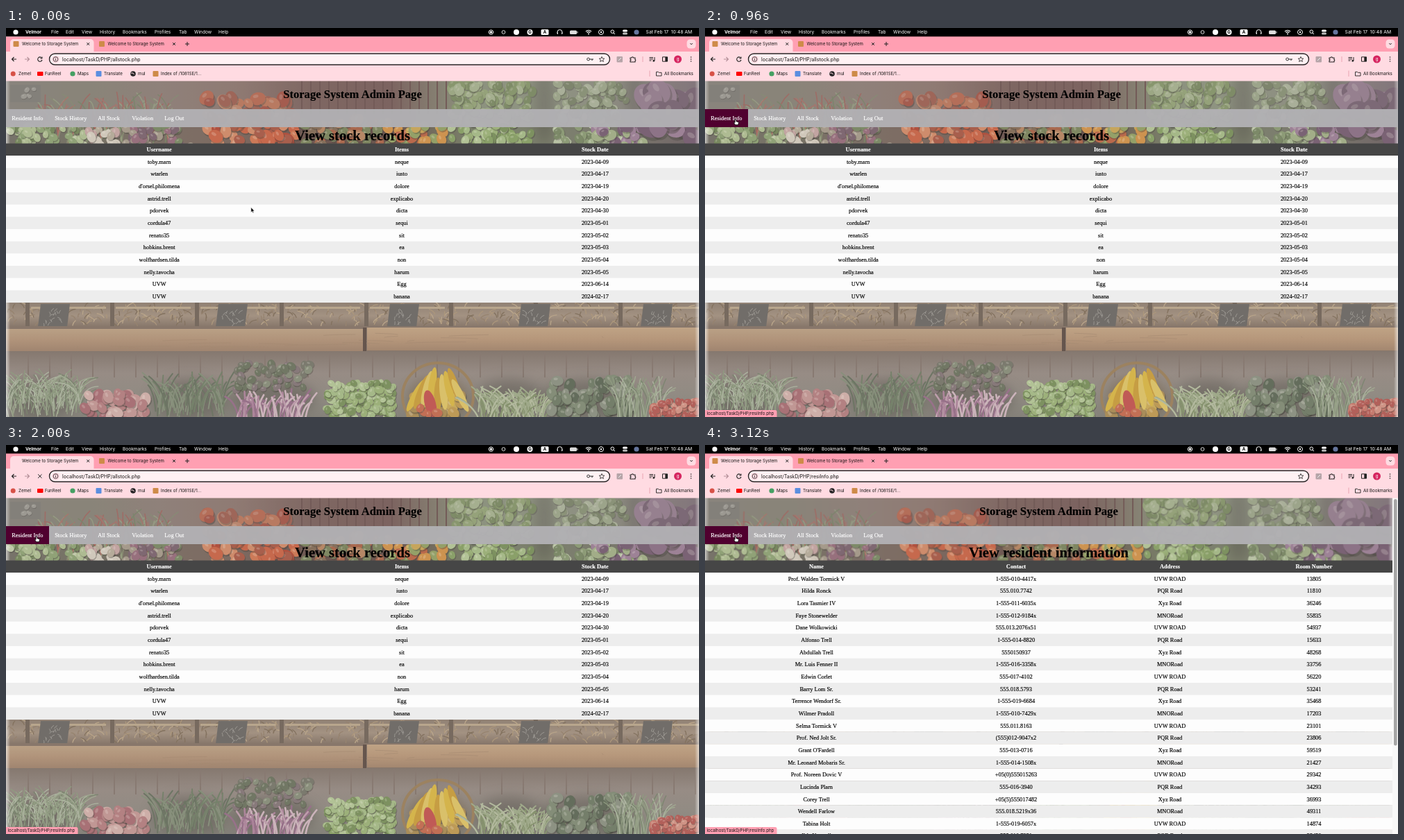
An HTML page with a canvas that plays this animation: 998 by 561 pixels, repeating every 3.2 s.

```html
<!DOCTYPE html>
<html lang="en">
<head>
<meta charset="utf-8">
<title>Storage System</title>
<style>
html, body { margin: 0; width: 100%; height: 100%; overflow: hidden; background: #fff; }
canvas, svg { position: absolute; left: 0; top: 0; width: 998px; height: 561px; }
text { white-space: pre; }
.ui { font-family: Inter, "Liberation Sans", sans-serif; }
.doc { font-family: "Liberation Serif", "Times New Roman", serif; }
.doc text { stroke-width: .16px; }
.m { text-anchor: middle; }
.e { text-anchor: end; }
.b { font-weight: 700; }
</style>
</head>
<body>
<canvas id="stage" width="998" height="561"></canvas>
<svg id="layer" viewBox="0 0 998 561"></svg>
<script>
const W = 998, H = 561, LOOP = 3200, STEP = 80;
const TIMES = { moveFrom: 40, moveTo: 640, settle: 880, status: 800, loading: 1840, loaded: 2160 };
const ROW = 17.65, TABLE_TOP = 166.5;
const LINKS = [[0, 62, 'Resident Info'], [62, 124, 'Stock History'], [124, 173, 'All Stock'], [173, 220, 'Violation'], [220, 265, 'Log Out']];

const stock = `toby.marn|neque|2023-04-09
wtarlen|iusto|2023-04-17
d'orsel.philomena|dolore|2023-04-19
astrid.trell|explicabo|2023-04-20
pdorvek|dicta|2023-04-30
cordula47|sequi|2023-05-01
renato35|sit|2023-05-02
hobkins.brent|ea|2023-05-03
wolfhardsen.tilda|non|2023-05-04
nelly.tavocha|harum|2023-05-05
UVW|Egg|2023-06-14
UVW|banana|2024-02-17`.split('\n').map(r => r.split('|'));

const roads = ['UVW ROAD', 'PQR Road', 'Xyz Road', 'MNORoad'];
const residents = `Prof. Walden Tormick V|1-555-010-4417x|13805
Hilda Ronck|555.010.7742|11810
Lora Tasmier IV|1-555-011-6035x|36246
Faye Stonewelder|1-555-012-9184x|55835
Dane Wolkowicki|555.013.2076x51|54937
Alfonso Trell|1-555-014-8820|15633
Abdullah Trell|5550150937|48268
Mr. Luis Fenner II|1-555-016-3358x|33756
Edwin Corlet|555-017-4102|56220
Barry Lom Sr.|555.018.5793|53241
Terrence Wendorf Sr.|1-555-019-6684|35468
Wilmer Pradoll|1-555-010-7429x|17203
Selma Tormick V|555.011.8163|23101
Prof. Ned Jolt Sr.|(555)012-9047x2|23806
Grant O'Fardell|555-013-0716|59519
Mr. Leonard Mobaris Sr.|1-555-014-1508x|21427
Prof. Noreen Dovic V|+05(0)555015263|29342
Lucinda Plarn|555-016-3940|34293
Corey Trell|+05(5)555017482|36993
Wendell Farlow|555.018.5219x36|49311
Tabina Holt|1-555-019-6057x|14874
Ilda Norwell|555.010.7381|28450`.split('\n').map((r, i) => {
  const [name, phone, room] = r.split('|');
  return [name, phone, roads[i % 4], room];
});

// ---------- text layer ----------
const txt = (x, y, s, size, cls = '', fill = '#111') =>
  `<text x="${x}" y="${y}" font-size="${size}" class="${cls}" fill="${fill}" stroke="${fill}" stroke-width="0">${s}</text>`;

function table(cols, heads, rows) {
  const line = (cells, y, cls, fill) => cells.map((c, k) => txt(cols[k], y, c, 8.35, cls, fill)).join('');
  return line(heads, 178.3, 'm b', '#fff') + rows.map((r, i) => line(r, 195.8 + ROW * i, 'm', '#000')).join('');
}

const page = (id, mid, title, url, body) => `<g id="${id}"><g class="doc">
  ${txt(mid, 101.3, 'Storage System Admin Page', 16.6, 'm b', '#000')}
  ${txt(mid, 161.5, title, 20.6, 'm b', '#000')}${body}</g>
  <g class="ui">${txt(81, 47.6, 'localhost/TaskD/PHP/' + url, 7.05)}</g></g>`;

const menu = [[65, 'File'], [86, 'Edit'], [109, 'View'], [135, 'History'], [168, 'Bookmarks'], [214, 'Profiles'], [249, 'Tab'], [271, 'Window'], [306, 'Help']];
const marks = [[18, 'Zemel'], [56, 'FunReel'], [103, 'Maps'], [141, 'Translate'], [190, 'mul'], [223, 'Index of /1081SE/1...']];
const $ = id => document.getElementById(id);

$('layer').innerHTML = `<g class="ui">
  ${txt(28, 8.4, 'Velmor', 6.6, 'b', '#fff')}
  ${menu.map(([x, s]) => txt(x, 8.4, s, 6.55, '', '#fff')).join('')}
  ${txt(988, 8.4, 'Sat Feb 17\u00a0 10:48 AM', 6.75, 'e', '#fff')}
  ${txt(776, 8.3, 'A', 6, 'm b', '#000')}${txt(754.5, 8.2, 'G', 6, 'm b', '#000')}
  ${[23, 146.5].map(x => txt(x, 25.2, 'Welcome to Storage System', 6.1)).join('')}
  ${marks.map(([x, s]) => txt(x, 68.2, s, 6.2)).join('')}
  ${txt(948, 68.2, 'All Bookmarks', 6.2)}
  ${txt(967.5, 47, 'g', 6, 'm', '#fff')}</g>
  <g class="doc">${LINKS.map(([x, , s]) => txt(x + 8.2, 132.6, s, 8.35, '', '#fff')).join('')}</g>
  ${page('stock', 499, 'View stock records', 'allstock.php', table([220.7, 570, 848.4], ['Username', 'Items', 'Stock Date'], stock))}
  ${page('people', 495, 'View resident information', 'resiInfo.php', table([160.5, 448, 669.5, 877], ['Name', 'Contact', 'Address', 'Room Number'], residents))}
  <g id="status" class="ui"><path d="M0 551H101Q103.5 551 103.5 553.5V561H0Z" fill="#ff9fb2"/>
    ${txt(2.5, 558, 'localhost/TaskD/PHP/resiInfo.php', 6.1)}</g>
  <path id="arrow" d="M0 0V7.4L1.7 5.9L2.8 8.5L4.1 7.9L3 5.4H5.2Z" fill="#000" stroke="#fff" stroke-width=".7"/>
  <path id="hand" d="M-.9 .6Q0-.6 .9 .6V3.2L4 4Q4.6 4.3 4.4 5.4L3.7 8.2H-.3L-2.6 5Q-2.4 3.9-.9 4.9Z" fill="#fff" stroke="#000" stroke-width=".8"/>`;

// ---------- photo backdrop ----------
const c = $('stage').getContext('2d');

function makePhoto() {
  const cv = document.createElement('canvas');
  cv.width = W; cv.height = H;
  const p = cv.getContext('2d');
  let seed = 11;
  const rnd = () => (seed = (seed * 16807) % 2147483647) / 2147483647;
  const pick = a => a[Math.floor(rnd() * a.length)];
  const box = (x, y, w, h, f) => { p.fillStyle = f; p.fillRect(x, y, w, h); };
  const oval = (x, y, rx, ry, turn, f) => {
    p.fillStyle = f; p.beginPath(); p.ellipse(x, y, rx, ry, turn, 0, 7); p.fill();
  };
  const ramp = (x0, y0, x1, y1, cols) => {
    const g = p.createLinearGradient(x0, y0, x1, y1);
    cols.forEach((k, i) => g.addColorStop(i / (cols.length - 1), k));
    return g;
  };
  // heap of rounded pieces, each with a shadow and a highlight
  const balls = (n, x, y, w, h, r, cols) => {
    for (let i = 0; i < n; i++) {
      const a = x + rnd() * w, b = y + rnd() * h, s = r * (.7 + rnd() * .5), turn = rnd() * 3;
      oval(a + r * .12, b + r * .2, s, s * .85, turn, 'rgba(70,66,60,.35)');
      oval(a, b, s, s * .8, turn, pick(cols));
      oval(a - s * .25, b - s * .3, s * .35, s * .2, turn, 'rgba(255,250,240,.2)');
    }
  };
  const stalks = (n, x, y, w, h, len, lean, width, cols) => {
    p.lineWidth = width; p.lineCap = 'round';
    for (let i = 0; i < n; i++) {
      const a = x + rnd() * w, b = y + rnd() * h, d = (rnd() - .5) * lean;
      p.strokeStyle = pick(cols);
      p.beginPath(); p.moveTo(a, b);
      p.quadraticCurveTo(a + d * .2, b - len * .6, a + d, b - len * (.6 + rnd() * .4));
      p.stroke();
    }
  };
  const shade = (x, y, rx, ry, f = 'rgba(88,82,76,.45)') => {
    p.save(); p.filter = 'blur(9px)'; oval(x, y, rx, ry, 0, f); p.restore();
  };
  const greens = ['#8f9a80', '#a1aa92', '#7c8570', '#adb4a0'];
  const leaves = ['#9cb07a', '#8aa069', '#b2c296', '#a5b888', '#7d9160'];
  const plum = ['#8d7387', '#9d8296', '#7a6274'];
  p.filter = 'blur(.6px)';

  // top display
  box(0, 76, W, 96, ramp(0, 0, W, 0, ['#8b877e', '#8b8878', '#94837a', '#947a70', '#7d5f59', '#7a5b56', '#8f9a7e', '#959e86', '#8f8f82', '#83737b']));
  for (let x = 425; x < 635; x += 13) box(x, 76, 2, 48, '#6d504b');
  shade(775, 110, 16, 60);
  shade(905, 100, 9, 60);
  box(0, 143, W, 26, 'rgba(84,78,70,.35)');
  stalks(170, 55, 125, 185, 45, 36, 46, 1.6, ['#a8675e', '#7b8868', '#9ca585', '#b0756a', '#8a8f74']);
  balls(45, 0, 142, 112, 28, 7, ['#aebb92', '#90a277', '#c0c8a8', '#78885f']);
  balls(22, 118, 146, 45, 24, 7, ['#d0c8bb', '#b5ab9a', '#c2a4a1']);
  balls(35, 170, 142, 95, 28, 7, ['#97707d', '#7f6872', '#7d8a68', '#a59a8b']);
  balls(75, 285, 100, 132, 68, 10, ['#c6694d', '#cc7a58', '#b0513f', '#ce8c6c', '#a85f4d']);
  balls(45, 425, 130, 125, 40, 8, ['#a9694f', '#86705c', '#7f8762', '#b58766']);
  balls(26, 548, 140, 85, 28, 8, ['#cd9350', '#c6a55c', '#94a068', '#b9694c']);
  balls(170, 640, 80, 118, 88, 7, leaves);
  balls(130, 792, 80, 105, 88, 7, ['#a6b490', '#b8c2a4', '#8d9b77', '#7c8968']);
  balls(25, 850, 140, 70, 30, 9, plum.concat('#a2ad88'));
  balls(18, 922, 87, 72, 76, 18, plum);
  box(6, 82, 44, 25, '#84827a');
  balls(5, 12, 86, 30, 16, 4, ['#a5a49b']);

  // baskets and price boards
  box(0, 394, W, 42, ramp(0, 394, 0, 436, ['#8e7f72', '#a39282', '#7e6e63']));
  stalks(480, 0, 402, W, 28, 7, 22, 1.3, ['#b9a58a', '#96836f', '#ac977c', '#83725f']);
  for (let x = 28; x < W; x += 122) {
    box(x, 396, 6, 36, '#776a5f');
    box(x + 8, 402, 108, 3, '#b8a68d');
  }
  for (const x of [50, 306, 553, 742, 918]) {
    p.save();
    p.translate(x, 398); p.transform(1, 0, -.12, 1, 0, 0);
    box(0, 0, 42, 34, '#716d69');
    stalks(16, 8, 10, 26, 22, 5, 12, .8, ['#a5a29c']);
    p.restore();
  }

  // shelf
  box(0, 430, W, 38, '#88776b');
  box(0, 434, 515, 32, ramp(0, 434, 0, 466, ['#b9a085', '#b0937a', '#a08570']));
  box(520, 432, 478, 33, ramp(0, 432, 0, 465, ['#bfa385', '#b6977b', '#a38770']));
  stalks(22, 0, 442, 900, 22, 2, 190, .6, ['#a58a73']);
  box(514, 432, 5, 34, '#65554d');

  // lower display
  box(0, 466, W, 95, ramp(0, 466, 0, H, ['#85786f', '#978c85', '#918b83', '#85827a']));
  for (let x = 0; x < W; x += 31) box(x, 468, 2, 36, '#887a72');
  for (const [x, rx] of [[50, 50], [265, 55], [385, 60], [725, 50], [840, 70]]) shade(x, 535, rx, 28);
  stalks(150, 0, 530, 110, 31, 42, 70, 1.4, greens);
  balls(50, 112, 527, 92, 34, 9, ['#c09794', '#b38182', '#cdaea8', '#a87176']);
  stalks(85, 215, 540, 105, 21, 46, 55, 2, ['#76816b', '#88907c', '#6d7564']);
  balls(55, 330, 482, 108, 40, 6, ['#7b7a6e', '#87797a', '#717764', '#8a8f7c']);
  stalks(60, 330, 566, 100, 10, 48, 45, 2.6, ['#ac859a', '#bd9dab', '#977189', '#cbb3ba']);
  balls(190, 460, 512, 100, 50, 6, leaves);
  shade(622, 535, 42, 30, 'rgba(110,84,50,.5)');
  p.strokeStyle = '#9c8260'; p.lineWidth = 4;
  p.beginPath(); p.ellipse(622, 531, 51, 48, 0, 0, 7); p.stroke();
  balls(22, 582, 530, 78, 30, 10, ['#bd9a57', '#c7a95d', '#a98d5a']);
  for (let i = 0; i < 9; i++)
    oval(590 + i * 8, 530 - (i % 4) * 5, 5.5, 26, .5 - i * .12, ['#d4b44c', '#c69d43', '#d9c06a'][i % 3]);
  oval(611, 542, 8, 20, -.25, '#c05a56');
  balls(4, 595, 548, 45, 12, 7, ['#c26f55']);
  stalks(120, 680, 550, 95, 18, 36, 70, 2, ['#9fa98a', '#87936f', '#b3b99e']);
  balls(85, 785, 505, 120, 55, 8, ['#747e6a', '#848d78', '#646d5c', '#8d9283']);
  stalks(60, 880, 560, 65, 5, 62, 50, 1.4, greens);
  balls(75, 930, 538, 70, 25, 6, ['#c57a6e', '#b2605a', '#cf9486']);

  p.filter = 'none';
  for (const [x0, x1] of [[0, 6], [W, W - 6]]) {
    p.fillStyle = ramp(x0, 0, x1, 0, ['rgba(255,255,255,.6)', 'rgba(255,255,255,0)']);
    p.fillRect(Math.min(x0, x1), 76, 6, 485);
  }
  return cv;
}
const photo = makePhoto();

// ---------- shapes ----------
const rect = (x, y, w, h, f) => { c.fillStyle = f; c.fillRect(x, y, w, h); };
const round = (x, y, w, h, r, f) => { c.fillStyle = f; c.beginPath(); c.roundRect(x, y, w, h, r); c.fill(); };
const dot = (x, y, r, f) => { c.fillStyle = f; c.beginPath(); c.arc(x, y, r, 0, 7); c.fill(); };
const line = (d, col = '#222', w = 1) => { c.strokeStyle = col; c.lineWidth = w; c.stroke(new Path2D(d)); };
const ring = (x, y, r, col, w = 1) => { c.strokeStyle = col; c.lineWidth = w; c.beginPath(); c.arc(x, y, r, 0, 7); c.stroke(); };
const cross = (x, y, r) => line(`M${x - r} ${y - r}L${x + r} ${y + r}M${x + r} ${y - r}L${x - r} ${y + r}`);

function drawMenuBar() {
  rect(0, 0, W, 12.5, '#000');
  dot(14, 6, 3.6, '#fff');
  ring(698.5, 6, 3.2, '#fff'); dot(698.5, 6, 1.8, '#fff');
  ring(716.5, 6, 2.4, '#ddd'); dot(735, 6, 4, '#fff'); dot(754.5, 6, 4, '#fff');
  round(770.5, 2, 11, 8, 1.5, '#fff');
  line('M794 8V6A3.4 3.4 0 0 1 801 6V8M794.3 6.5V9M800.7 6.5V9', '#fff');
  round(812, 3.5, 10, 5.5, 1.5, '#ddd'); rect(822.5, 5, 1, 2.5, '#ddd');
  line('M835 5Q839 1.5 843 5M836.6 6.8Q839 4.6 841.4 6.8', '#fff', 1.2); dot(839, 8.6, 1, '#fff');
  ring(857, 6, 3.5, '#fff'); dot(857, 6, 1.2, '#fff');
  ring(873.3, 5.2, 2.3, '#fff'); line('M875 7L877 9', '#fff');
  round(888, 2.5, 7, 3, 1.5, '#fff'); round(888, 6.5, 7, 3, 1.5, '#bbb');
  dot(908, 6, 3.6, '#65759c');
}

function drawBrowser(loading, loaded) {
  rect(0, 12.5, W, 22, '#ff9fb2');
  round(6, 16, 120.5, 24, 5, '#ffdbe2');
  rect(0, 34, W, 42.5, '#ffdbe2');
  if (!loading) round(10.5, 19, 8, 8, 1, '#ce8b49');
  round(134, 19, 8, 8, 1, '#ce8b49');
  cross(118.3, 23, 1.9); cross(242, 23, 1.9);
  line('M258 23H264M261 20V26');
  round(980.5, 16.5, 13, 13, 4.5, '#ffdbe2');
  line('M985.3 22L987 23.8L988.7 22');

  line('M15 45H8.5M11.5 42L8.5 45L11.5 48', '#222', 1.1);
  line('M27 45H33.5M30.5 42L33.5 45L30.5 48', '#b38f98', 1.1);
  if (loading) cross(48.8, 45, 2.7);
  else { line('M51.5 43.2A3.2 3.2 0 1 0 52 46', '#222', 1.1); line('M52 41.5V44H49.5'); }
  c.fillStyle = '#fff1f3';
  c.beginPath(); c.roundRect(62.5, 37, 807, 16, 8); c.fill();
  c.strokeStyle = '#2b2729'; c.lineWidth = 1.4; c.stroke();
  dot(71.5, 45, 5.5, '#ffdbe2');
  ring(71.5, 45, 3.4, '#222', .8); line('M71.5 44.5V47M71.5 42.8V43.6', '#222', .8);
  if (!loaded) { ring(838.6, 45, 1.9, '#333'); line('M840.5 45H846M844 45V47', '#333', 1.1); }
  line('M858 41.4L859.1 43.9L861.8 44.1L859.7 45.9L860.4 48.5L858 47.1L855.6 48.5L856.3 45.9L854.2 44.1L856.9 43.9Z', '#222', .8);
  round(879.5, 41, 8.5, 8.5, 1, '#b6a4a8'); line('M882 47L886 43', '#eee');
  line('M899 43H901A1.3 1.3 0 0 1 903.6 43H906V45.5A1.1 1.1 0 0 1 906 47.6V49H899V47A1 1 0 0 0 899 45Z', '#222', 1.1);
  line('M917 41V49', '#e9a3b1');
  line('M926.5 42.5H932M926.5 44.7H932M926.5 47H929.5M934 42V47'); dot(932.8, 47.3, 1.4, '#222');
  line('M945.5 41.8H952.5V48.2H945.5Z'); rect(949.3, 42, 3.2, 6, '#222');
  dot(967.5, 45, 5.5, '#d6245f');
  for (const y of [42, 45, 48]) dot(986.5, y, .8, '#222');

  dot(10.2, 66, 3.5, '#d75147');
  round(45, 63, 8.5, 6, 1, '#f00');
  dot(96, 66, 3.6, '#45a063');
  round(129.5, 62, 8, 8, 1, '#5b8ee0');
  dot(183, 66, 3.8, '#262426'); line('M180 65H183L184.5 67', '#ffdbe2');
  round(211.5, 62, 8, 8, 1, '#ce8b49');
  line('M927 61.5V70', '#e9a3b1');
  line('M936.5 63.3H939.3L940.3 64.3H944V69H936.5Z', '#222', .9);
}

function drawPage(loaded, pos) {
  const w = loaded ? 990 : W;
  rect(0, 76, W, 485, '#fafafa');
  c.drawImage(photo, 0, 76, W, 485, 0, 76, w, 485 * w / W);
  rect(0, 76, w, 41, 'rgba(128,124,124,.27)');
  rect(0, 117, w, 26, 'rgba(177,176,179,.97)');
  const over = pos.y >= 117 && pos.y < 143 && LINKS.find(([a, b]) => pos.x >= a && pos.x < b);
  if (over) rect(over[0], 117, over[1] - over[0], 26, '#50002f');
  rect(0, TABLE_TOP, w, ROW, '#464646');
  (loaded ? residents : stock).forEach((_, i) =>
    rect(0, TABLE_TOP + ROW * (i + 1), w, ROW + .1, i % 2 ? '#ededed' : '#fdfdfd'));
  if (loaded) {
    rect(990, 76, 8, 485, '#f8f8f8');
    round(992, 78, 4.6, 355.5, 2.3, '#a5a5a5');
  }
  return !!over;
}

// ---------- motion ----------
const span = (t, a, b) => Math.min(1, Math.max(0, (t - a) / (b - a)));
const ease = u => u * u * (3 - 2 * u);

function pointer(t) {
  const u = ease(span(t, TIMES.moveFrom, TIMES.moveTo));
  const v = ease(span(t, TIMES.moveTo, TIMES.settle));
  return { x: 352.8 - 300.3 * u - 8.5 * v, y: 258.5 - 127.7 * u + .7 * v };
}
const show = (id, on) => $(id).setAttribute('visibility', on ? 'visible' : 'hidden');

function frame(now) {
  const t = Math.floor((now % LOOP) / STEP) * STEP;
  const loaded = t >= TIMES.loaded;
  const pos = pointer(t);
  const over = drawPage(loaded, pos);
  drawMenuBar();
  drawBrowser(t >= TIMES.loading && !loaded, loaded);
  show('stock', !loaded);
  show('people', loaded);
  show('status', t >= TIMES.status);
  show('arrow', !over);
  show('hand', over);
  for (const id of ['arrow', 'hand']) $(id).setAttribute('transform', `translate(${pos.x} ${pos.y})`);
  requestAnimationFrame(frame);
}
requestAnimationFrame(frame);
</script>
</body>
</html>
```
